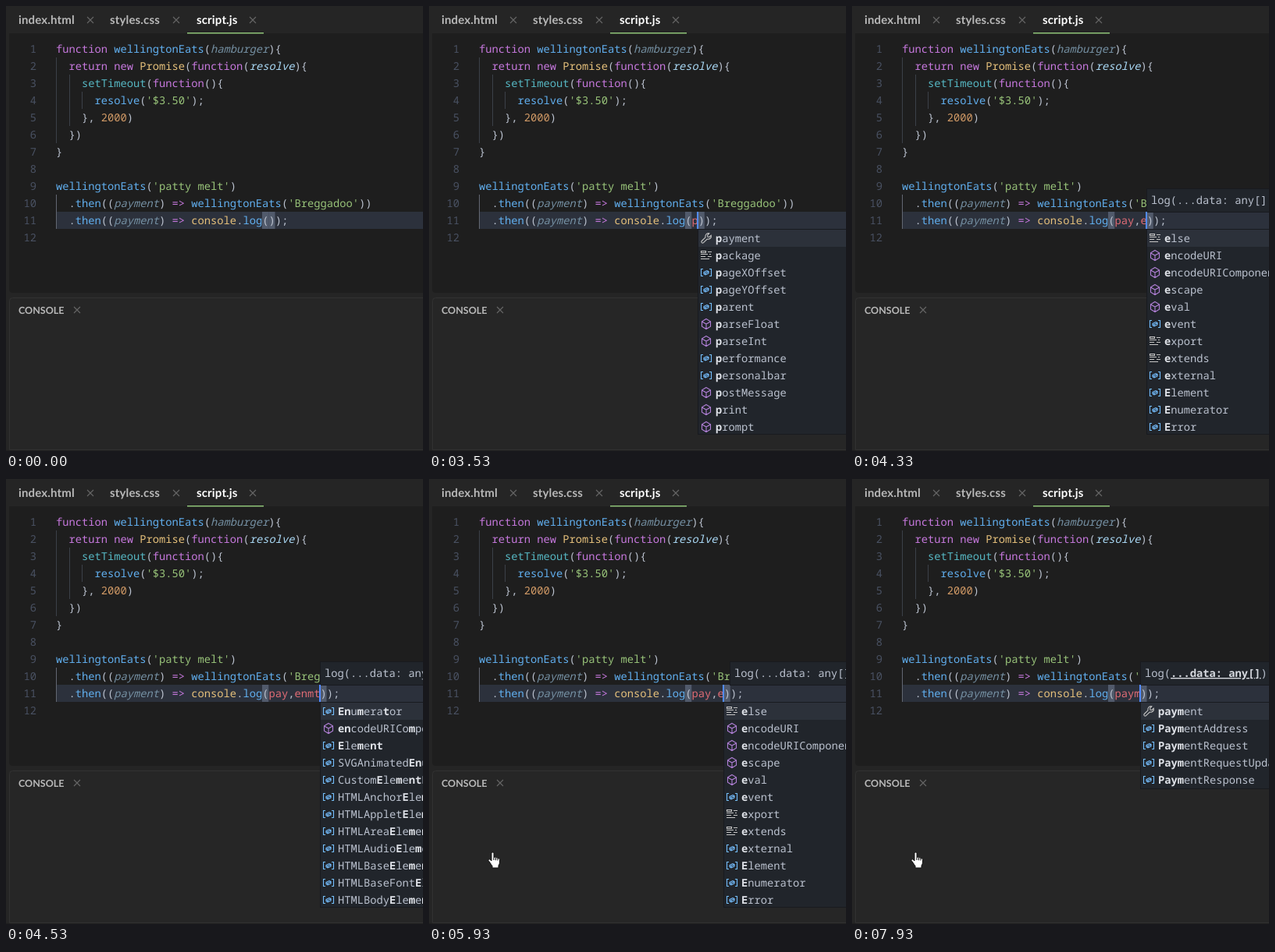
Recreate the animation shown at these times as an HTML page. Size 534 by 571 pixels, loop 8000 ms.

```html
<!DOCTYPE html>
<html lang="en">
<head>
<meta charset="utf-8">
<title>Editor</title>
<style>
html, body { margin: 0; width: 100%; height: 100%; overflow: hidden; background: #252525; }
svg { display: block; width: 534px; height: 571px; }
text { white-space: pre; text-rendering: geometricPrecision; }
.code { font: 13.75px "Noto Sans Mono", "DejaVu Sans Mono", monospace; fill: #bbc2cf; }
.ui { font: 700 15px Lato, "Open Sans", sans-serif; letter-spacing: .15px; fill: #b8b8b8; }
.num { fill: #495162; text-anchor: end; }
.k { fill: #c678dd; }
.f { fill: #61afef; }
.c { fill: #56b6c2; }
.y { fill: #e5c07b; }
.s { fill: #98c379; }
.n { fill: #d19a66; }
.r { fill: #e06c75; }
.p { fill: #a9d8f5; font-style: italic; }
.u { fill: #7590a3; font-style: italic; }
.b { fill: #dfe2e8; font-weight: 700; }
.a { fill: #d7dae0; font-weight: 700; text-decoration: underline; }
.line { fill: none; stroke-width: 1.1; }
</style>
</head>
<body>
<svg viewBox="0 0 534 571">
  <rect width="534" height="571" fill="#252525"/>
  <path d="M4 35H534V368H9Q4 368 4 363Z" fill="#1e1e1e"/>
  <path d="M540 374.5H8.500Q4.500 374.500 4.500 378.500V569.500H540" fill="#262626" stroke="#323232"/>
  <rect y="570" width="534" height="1" fill="#1f1f1f"/>
  <rect x="232" y="34" width="98" height="1.500" fill="#8fc379"/>
  <g class="ui">
    <text x="16" y="23">index.html</text>
    <text x="133" y="23">styles.css</text>
    <text x="244" y="23" style="fill:#fff">script.js</text>
    <text x="16" y="395" style="font-size:12.5px;letter-spacing:0">CONSOLE</text>
  </g>
  <g id="closers" class="line" stroke="#666"></g>
  <rect x="64" y="264" width="470" height="22" fill="#2c313c"/>
  <path class="line" d="M64.500 66V176M81.500 88V154M97.500 110V132" stroke="#3b4048" style="stroke-width:1"/>
  <path class="line" d="M64.500 242V286" stroke="#626772" style="stroke-width:1"/>
  <g id="code" class="code"></g>
  <g id="live" class="code"></g>
  <g id="hand" transform="translate(75 478)">
    <path d="M5 2.500Q5 1 6.500 1T8 2.500V7.500Q9.500 6.500 10.500 8Q12 7 13 8.600Q15.500 8 15.500 10.500V14Q15.500 16 14 18V21H6V18.500Q4.500 17 3.500 14.800L1 11.500Q.8 9.300 2.800 9.900L5 12Z" fill="#fff" stroke="#111"/>
    <path class="line" d="M8 7.500V11M10.500 8V11.300M13 8.600V11.600" stroke="#111"/>
  </g>
</svg>
<script>
const LOOP = 8000, CHAR = 8.25, LEFT = 64, ROW = 22, ARG_COL = 33;
const el = id => document.getElementById(id);
const mid = row => 55 + ROW * (row - 1);
const span = (cls, s) => `<tspan class="${cls}">${s}</tspan>`;
const paint = s => s.replace(/\{(\w)\|(.*?)\}/g, (_, cls, word) => span(cls, word));
const text = (x, y, body, cls = '') => `<text class="${cls}" x="${x}" y="${y + 5}">${body}</text>`;
const rect = (x, y, w, h, style) => `<rect x="${x}" y="${y}" width="${w}" height="${h}" ${style}/>`;

const source = [
  '{k|function} {f|wellingtonEats}({u|hamburger}){',
  '  {k|return} {k|new} {y|Promise}({k|function}({p|resolve}){',
  '    {c|setTimeout}({k|function}(){',
  "      {f|resolve}({s|'$3.50'});",
  '    }, {n|2000})',
  '  })',
  '}',
  '',
  "{f|wellingtonEats}({s|'patty melt'})",
  "  .{f|then}(({u|payment}) {k|=>} {f|wellingtonEats}({s|'Breggadoo'}))",
  '',
  ''
];
const lastLine = '  .{f|then}(({u|payment}) {k|=>} {y|console}.{f|log}(';

const icons = {
  wrench: ['#c5c5c5', 'M2.3 13.7a1.6 1.6 0 0 1 0-2.200L7 6.800C6.400 4.200 8 1.600 11 1.600l.8.2L9.600 4.200l.3 2 2 .3 2.400-2.200c.7 3-1.700 5.300-5.100 4.800l-4.700 4.600a1.6 1.6 0 0 1-2.200 0z'],
  word: ['#c5c5c5', 'M1.500 2.500H7.500V4.500H1.500ZM10 3.500H15M1 6.500H10M12 6.500H14M1 9.500H7M10 9.500H15M1 12.500H12'],
  cube: ['#b180d7', 'M8 1.500L13.500 4.700V11.200L8 14.500L2.500 11.200V4.700ZM2.500 4.900L8 8L13.500 4.900M8 8V14.500'],
  value: ['#75beff', 'M4 3.500H1.500V12.500H4M12 3.500H14.500V12.500H12M5 7.500L9 5.500L11 6.500V9L7 10.800L5 9.600ZM5 7.500L7 8.500L11 6.700M7 8.500V10.500']
};
const keywords = 'package else export extends enum'.split(' ');
const methods = 'parseFloat parseInt postMessage print prompt encodeURI encodeURIComponent escape eval'.split(' ');
const iconOf = w => icons[w === 'payment' ? 'wrench' : keywords.includes(w) ? 'word' : methods.includes(w) ? 'cube' : 'value'];

const pays = 'payment PaymentAddress PaymentRequest PaymentRequestUpdateEvent PaymentResponse';
const elements = 'Enumerator encodeURIComponent Element SVGAnimatedEnumeration CustomElementRegistry '
  + 'Anchor Applet Area Audio Base BaseFont Body'.replace(/\w+/g, 'HTML$&Element');
const words = {
  p: 'payment package pageXOffset pageYOffset parent parseFloat parseInt performance personalbar postMessage print prompt',
  pa: 'payment package pageXOffset pageYOffset parent parseFloat parseInt PageTransitionEvent PannerNode Path2D PaymentAddress PaymentRequest',
  pay: pays,
  paym: pays,
  e: 'else encodeURI encodeURIComponent escape eval event export extends external Element Enumerator Error',
  en: 'encodeURI encodeURIComponent Enumerator enum event extends external Element EventSource EventTarget ErrorEvent MessageEvent',
  enm: elements,
  enmt: elements
};

// time, typed argument, suggestion key, hint column (-1 hides it)
const steps = [
  [0, '', '', -1],
  [3470, 'p', '', -1],
  [3530, 'p', 'p', -1],
  [3800, 'pa', 'pa', -1],
  [3930, 'pay', 'pay', -1],
  [4130, 'pay,', '', -1],
  [4270, 'pay,e', '', -1],
  [4330, 'pay,e', 'e', 5],
  [4400, 'pay,en', 'en', 6],
  [4470, 'pay,enm', 'enm', 7],
  [4530, 'pay,enmt', 'enmt', 8],
  [5670, 'pay,enm', 'enm', 8],
  [5730, 'pay,enm', 'enm', 7],
  [5870, 'pay,en', 'en', 7],
  [5930, 'pay,e', 'e', 6],
  [6000, 'pay,', '', 5],
  [6070, 'pay,', '', 4],
  [6200, 'pay', '', 4],
  [6270, 'pay', '', 3],
  [7870, 'paym', '', 3],
  [7930, 'paym', 'paym', 4]
];
const caretFlips = [800, 1330, 1800, 2330, 2800, 3330, 3470, 5000, 5530, 6730, 7200, 7730, 7870];
const handFlips = [5270, 6000, 7870];
const isOn = (flips, t) => flips.filter(f => f <= t).length % 2 === 1;

// Positions of the key's letters in a word, or null when one is missing.
function find(word, key) {
  const low = word.toLowerCase();
  let at = low[0] === key[0] ? 0 : Math.max(0, word.indexOf('E'));
  const hits = [];
  for (const ch of key) {
    at = low.indexOf(ch, at);
    if (at < 0) return null;
    hits.push(at++);
  }
  return hits;
}

function highlight(word, key) {
  const swapped = key[0] + (key[2] || '') + (key[1] || '') + key.slice(3);
  const hits = find(word, key) || find(word, swapped) || [];
  return [...word].map((ch, i) => hits.includes(i) ? span('b', ch) : ch).join('');
}

function suggestions(x, key) {
  const list = words[key].split(' ');
  const height = Math.min(list.length * ROW, 262);
  let out = rect(x + .5, 286.5, 300, height + 1, 'fill="#21252b" stroke="#181a1f"')
    + rect(x + 1, 287, 300, ROW, 'fill="#2c313a"');
  list.forEach((word, i) => {
    const y = 298 + i * ROW, [color, d] = iconOf(word);
    out += `<path class="line" transform="translate(${x + 3} ${y - 8})" stroke="${color}" d="${d}"/>`
      + text(x + 23, y, highlight(word, key));
  });
  return out;
}

function hint(x, first) {
  const data = '...data: any[]';
  return rect(x + .5, 234.5, 300, 30, 'fill="#21252b" stroke="#181a1f"')
    + text(x + 6, 249, `log(${first ? span('a', data) : data}): void`);
}

function scene([, arg, key, hintCol], caret) {
  const start = LEFT + ARG_COL * CHAR, end = start + arg.length * CHAR;
  const match = 'fill="#515a6b"';
  const typed = arg.replace(/\w+/g, w => span('r', w));
  let out = rect(start - CHAR, 264, CHAR, ROW, match) + rect(end, 264, CHAR, ROW, match)
    + text(LEFT, mid(11), paint(lastLine) + typed + '));');
  if (hintCol >= 0) out += hint(Math.floor(start + hintCol * CHAR), !arg.includes(','));
  if (key) out += suggestions(Math.floor(end), key);
  if (caret) out += rect(Math.floor(end) - 1, 264, 2, ROW, 'fill="#528bff"');
  return out;
}

el('closers').innerHTML = [[108, 18], [218, 18], [316, 18], [91, 390]]
  .map(([x, y]) => `<path d="M${x - 4} ${y - 4}l8 8m0-8l-8 8"/>`).join('');
el('code').innerHTML = source
  .map((s, i) => text(39, mid(i + 1), i + 1, 'num') + text(LEFT, mid(i + 1), paint(s))).join('');

let shown = '';
function draw(now) {
  const t = now % LOOP;
  const index = steps.filter(s => s[0] <= t).length - 1;
  const caret = isOn(caretFlips, t);
  const id = index + '/' + caret;
  if (id !== shown) {
    el('live').innerHTML = scene(steps[index], caret);
    shown = id;
  }
  el('hand').style.display = isOn(handFlips, t) ? '' : 'none';
}

const begin = performance.now();
function tick() {
  draw(performance.now() - begin);
  requestAnimationFrame(tick);
}
tick();
</script>
</body>
</html>
```
